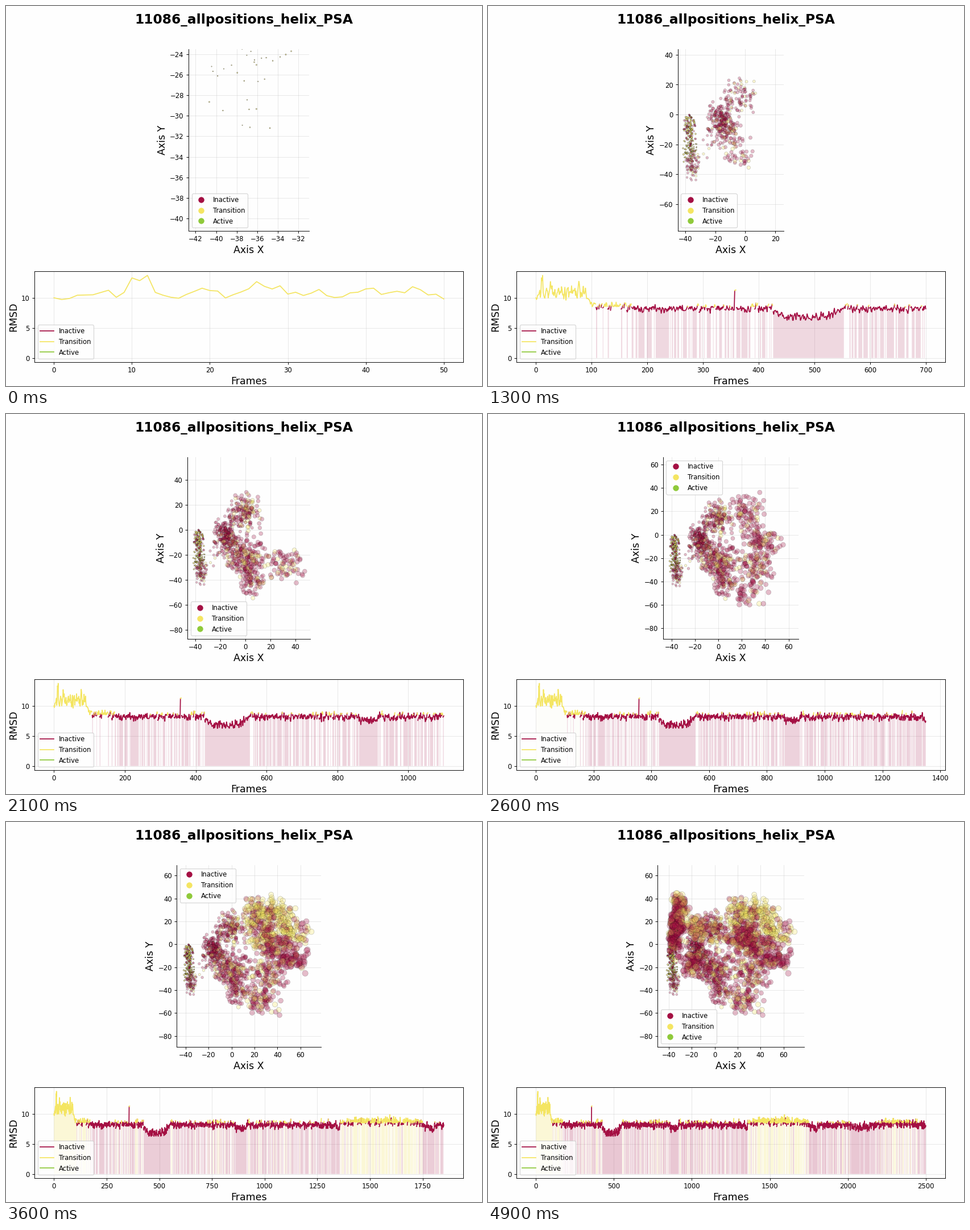
Write a matplotlib script that moves like this. It is 837 by 669 pixels and loops after 5 s.

```python
import numpy as np
import matplotlib.pyplot as plt
from matplotlib.animation import FuncAnimation
from matplotlib.colors import to_rgb
from matplotlib.lines import Line2D

W, H, DPI = 837, 669, 83.7
FRAMES, INTERVAL, STEP = 50, 100, 50
TOTAL = FRAMES * STEP + 1
BACKGROUND = "#fefefe"
CRIMSON, YELLOW, GREEN = "#a40f43", "#f4e562", "#8fc93a"
STATES = {"Inactive": CRIMSON, "Transition": YELLOW, "Active": GREEN}
THRESHOLD = 8.5

rng = np.random.default_rng(11086)
index = np.arange(TOTAL)

# (centre, half width, change) of the stretches that leave the base level
EVENTS = [(46, 47, 2.9), (11, 1.5, 2), (130, 40, 0.5), (358, 1.5, 3),
          (484, 50, -1.4), (885, 25, -0.5), (1350, 6, -0.8), (1560, 200, 0.5),
          (1782, 22, -0.7), (2090, 60, -0.4), (2340, 90, 0.3)]

# Centres of the regions visited one after another
REGIONS = [(-37, -22.5), (-37, -8), (-35, -36), (-16, -3), (-3, 13), (-17, -2),
           (-12, -12), (-4, -26), (2, 18), (4, -42), (4, -20), (33, -29),
           (24, 22), (41, -10), (27, -50), (22, 30), (42, 27), (54, 9),
           (28, 7), (55, -12), (-20, -18), (-36, 3), (-34, 17), (25, 4),
           (-17, 15), (-31, 35), (-33, 16)]

# (frame, x min, x max, y min, y max)
LIMITS = np.array([
    (0, -42.69, -30.97, -41.2, -23.53), (8, -44.6, 10.2, -67.95, 34.35),
    (17, -45.7, 38.4, -85.9, 51.3), (26, -47.3, 68.6, -89.1, 66.3),
    (36, -47.7, 77.8, -89.5, 69), (41, -49.8, 78, -89.5, 69)])


def make_rmsd():
    noise = rng.normal(size=TOTAL).clip(-2.2, 2.6)
    noise = 0.9 * noise + 0.4 * np.roll(noise, 1)
    values = 8.25 + noise * np.where(index < 93, 0.6, 0.36)
    for centre, width, change in EVENTS:
        values += change / (1 + ((index - centre) / width) ** 12)
    return values.clip(6.3, 13.8)


def make_positions():
    """Scatter points around each region, a few on the way from the last."""
    regions = np.array(REGIONS)
    stage = index * len(regions) // TOTAL
    centre, previous = regions[stage], regions[np.maximum(stage - 1, 0)]
    way = rng.random((TOTAL, 1)) ** 8
    x, y = (centre + (previous - centre) * way).T
    u, v = rng.triangular(-2.45, 0, 2.45, (2, TOTAL))
    spread_x = np.interp(x, [-37, -15, 20], [2, 4.2, 6.5])
    spread_y = np.interp(x, [-37, 20], [4, 6])
    return x + spread_x * u, y + spread_y * v


rmsd = make_rmsd()
pos_x, pos_y = make_positions()
inactive = rmsd < THRESHOLD
# The inactive line runs on to the first point after each stretch
inactive_line = inactive | np.roll(inactive, 1)
inactive_line[0] = False

sizes = 1.2 + 0.042 * index
faces = np.where(inactive[:, None], to_rgb(CRIMSON), to_rgb(YELLOW))
faces = np.column_stack([faces, np.where(index < 170, 0.6, 0.28)])
edges = np.zeros((TOTAL, 4))
edges[:, 3] = np.where(index < 170, 0.6, 0.28)

fig = plt.figure(figsize=((W + 0.01) / DPI, (H + 0.01) / DPI), dpi=DPI,
                 facecolor=BACKGROUND)
fig.suptitle("11086_allpositions_helix_PSA", fontsize=20, fontweight="bold")


def add_axes(left, top, right, bottom):
    return fig.add_axes([left / W, 1 - bottom / H,
                         (right - left) / W, (bottom - top) / H])


ax_map = add_axes(50, 76, 804, 396)
ax_rmsd = add_axes(50, 467, 804, 627)
dot_handles = [Line2D([0], [0], marker="o", color="w", markerfacecolor=color,
                      markersize=10, label=name)
               for name, color in STATES.items()]
line_handles = [Line2D([0], [0], color=color, label=name)
                for name, color in STATES.items()]


def style(ax, xlabel, ylabel):
    ax.clear()
    ax.set_facecolor(BACKGROUND)
    ax.set_axisbelow(True)
    ax.grid(alpha=0.3)
    ax.set_xlabel(xlabel, fontsize=15, labelpad=3)
    ax.set_ylabel(ylabel, fontsize=15)


def draw_map(frame, count):
    style(ax_map, "Axis X", "Axis Y")
    ax_map.spines[["top", "right"]].set_visible(False)
    ax_map.scatter(pos_x[:count], pos_y[:count], s=sizes[:count],
                   c=faces[:count], edgecolors=edges[:count], linewidths=0.45)
    x0, x1, y0, y1 = (np.interp(frame, LIMITS[:, 0], column)
                      for column in LIMITS[:, 1:].T)
    ax_map.set_xlim(x0, x1)
    ax_map.set_ylim(y0, y1)
    ax_map.set_aspect("equal", adjustable="box")
    low = frame < 4 or 13 <= frame < 22 or frame >= 45
    ax_map.legend(handles=dot_handles,
                  loc="lower left" if low else "upper left")


def draw_rmsd(frame, count):
    style(ax_rmsd, "Frames", "RMSD")
    x, y, off = index[:count], rmsd[:count], inactive[:count]
    ax_rmsd.plot(x, np.where(inactive_line[:count], y, np.nan), color=CRIMSON)
    ax_rmsd.plot(x, np.where(off, np.nan, y), color=YELLOW)
    yellow_alpha = np.interp(frame, [25, 36], [0, 0.25])
    for where, color, alpha in ((off, CRIMSON, 0.13 + 0.002 * frame),
                                (~off, YELLOW, yellow_alpha)):
        ax_rmsd.fill_between(x, y, where=where, color=color, linewidth=0,
                             alpha=alpha)
    last = count - 1
    ax_rmsd.set_xlim(-0.05 * last, 1.05 * last)
    ax_rmsd.set_ylim(-0.69, 14.49)
    ax_rmsd.legend(handles=line_handles, loc="lower left")


def update(frame):
    count = STEP * (frame + 1) + 1
    draw_map(frame, count)
    draw_rmsd(frame, count)
    return []


anim = FuncAnimation(fig, update, frames=FRAMES, interval=INTERVAL,
                     repeat=True, repeat_delay=0, blit=False)
plt.show()
```
